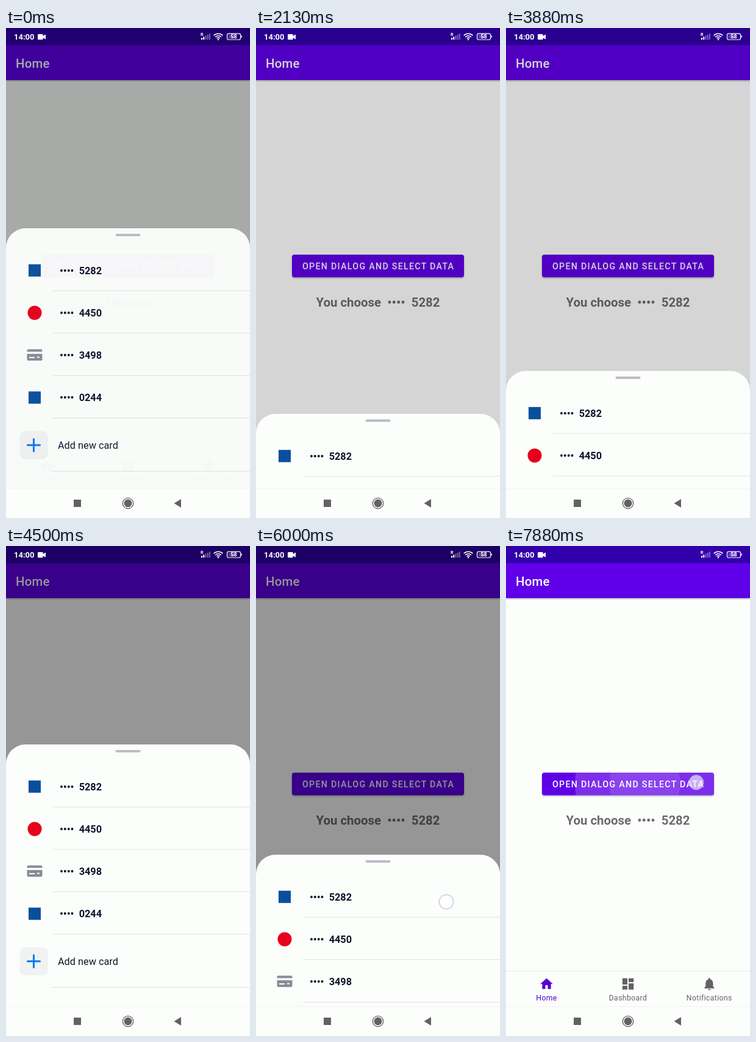
These frames come from a looping animation (400x800 px, 8 s). An HTML page:

```html
<!DOCTYPE html>
<html lang="en">
<head>
<meta charset="utf-8">
<title>Bottom sheet card picker</title>
<style>
  html, body { margin: 0; width: 100%; height: 100%; overflow: hidden; background: #fcfefc; }
  svg { display: block; width: 100%; height: 100%; }
  text { font-family: Roboto, "Noto Sans", sans-serif; white-space: pre; }
  .title { font-size: 20.4px; font-weight: 500; letter-spacing: .25px; fill: #fff; }
  .action { font-size: 14.26px; font-weight: 500; letter-spacing: 1.27px; fill: #fff; }
  .choice { font-size: 20.4px; font-weight: 700; fill: #6c6c6c; text-anchor: middle; }
  .tab text { font-size: 12.2px; letter-spacing: .4px; text-anchor: middle; }
  .row { font-size: 16.3px; fill: #10142b; }
  .card { font-weight: 700; }
</style>
</head>
<body>
<svg viewBox="0 0 400 800">
  <defs>
    <filter id="shadow" x="-10%" y="-30%" width="120%" height="180%">
      <feDropShadow dx="0" dy="1.5" stdDeviation="1.3" flood-opacity=".3"/>
    </filter>
    <clipPath id="buttonShape"><rect x="59" y="370" width="282" height="37" rx="4"/></clipPath>
  </defs>

  <!-- Home screen -->
  <rect width="400" height="800" fill="#fcfefc"/>
  <rect y="28" width="400" height="57" fill="#6000e8" filter="url(#shadow)"/>
  <rect width="400" height="28" fill="#3200aa"/>
  <text class="title" x="16" y="65">Home</text>
  <rect x="59" y="370" width="282" height="37" rx="4" fill="#6000e8" filter="url(#shadow)"/>
  <g id="ripple" clip-path="url(#buttonShape)" fill="#fff">
    <circle cx="227.5" cy="388" r="114.5" fill-opacity=".18"/>
    <circle cx="227.5" cy="388" r="58.5" fill-opacity=".1"/>
  </g>
  <text class="action" x="76" y="394">OPEN DIALOG AND SELECT DATA</text>
  <text class="choice" id="choice" x="200" y="455"></text>
  <rect y="693" width="400" height="1.5" fill="#eff0ef"/>
  <g id="tabs"></g>

  <rect id="dim" width="400" height="800"/>

  <!-- Sheet, drawn with its top edge at y = 0 -->
  <g id="sheet">
    <path d="M0 500V32A32 32 0 0 1 32 0H368A32 32 0 0 1 400 32V500Z" fill="#fcfefc"/>
    <rect x="179.5" y="9" width="41" height="4" rx="2" fill="#bcbcc8"/>
    <g id="rows"></g>
    <g fill="#878d98">
      <path d="M34.500 201.500V199.500A2 2 0 0 1 36.500 197.500H57.500A2 2 0 0 1 59.500 199.500V201.500Z"/>
      <path d="M34.500 205H59.500V214A2 2 0 0 1 57.500 216H36.500A2 2 0 0 1 34.500 214Z"/>
    </g>
    <path d="M38 211H47M51 210.500H55" stroke="#fcfefc" stroke-width="2"/>
    <rect x="22.500" y="331" width="46.500" height="46" rx="9" fill="#f1f2f2"/>
    <path d="M35.500 354H55.500M45.500 344V364" stroke="#0a78f0" stroke-width="3" stroke-linecap="round"/>
    <text class="row" x="85" y="360.300">Add new card</text>
    <rect x="74" y="396" width="326" height="1.200" fill="#e4e6e7"/>
  </g>

  <!-- System bars -->
  <rect y="752" width="400" height="48" fill="#fcfefc"/>
  <rect y="751.500" width="400" height="1" fill="#f1f2f1"/>
  <g fill="#626262">
    <rect x="111" y="770" width="12" height="12"/>
    <circle cx="200" cy="776" r="6.500"/>
    <circle cx="200" cy="776" r="8.700" fill="none" stroke="#626262" stroke-width="1.300"/>
    <path d="M287 769V783L275.500 776Z"/>
  </g>
  <g fill="#fff">
    <text x="13" y="18.800" font-size="13" font-weight="700">14:00</text>
    <path d="M53 10H60.500V13L65 10.500V18.500L60.500 16V19H53Q52 19 52 18V11Q52 10 53 10Z"/>
    <text x="319" y="13" font-size="7" font-weight="700">R</text>
    <g id="signal"></g>
    <g fill="none" stroke="#fff" stroke-width="1.500">
      <path d="M340.600 12.200A10.500 10.500 0 0 1 355.400 12.200M343.100 14.700A7 7 0 0 1 352.900 14.700M345.500 17A3.600 3.600 0 0 1 350.500 17"/>
      <rect x="362.500" y="9.200" width="22" height="9.800" rx="2.500" stroke-width="1.200"/>
    </g>
    <circle cx="348" cy="18.700" r="1.200"/>
    <rect x="385.300" y="12.300" width="1.500" height="3.500" rx=".7"/>
    <rect x="364.300" y="11" width="11" height="6.200" fill-opacity=".25"/>
    <text x="373.500" y="17.400" font-size="9" font-weight="700" text-anchor="middle">58</text>
  </g>

  <circle id="touch" cx="312" r="11.600" fill="#fff" fill-opacity=".62" stroke="#b9b9e0" stroke-opacity=".75" stroke-width="1.600"/>
</svg>

<script>
const LOOP = 8000, STEP = 125, OPEN = 324, HIDDEN = 760, DIM = .41;
const $ = id => document.getElementById(id);

const tabs = [
  ['Home', 66.5, '#5600d8', 'M10 20v-6h4v6h5v-8h3L12 3 2 12h3v8z'],
  ['Dashboard', 200, '#626262', 'M3 13h8V3H3v10zm0 8h8v-6H3v6zm10 0h8V11h-8v10zm0-18v6h8V3h-8z'],
  ['Notifications', 333.3, '#626262', 'M12 22c1.1 0 2-.9 2-2h-4c0 1.1.89 2 2 2zm6-6v-5c0-3.07-1.64-5.64-4.5-6.32V4c0-.83-.67-1.5-1.5-1.5s-1.5.67-1.5 1.5v.68C7.63 5.36 6 7.92 6 11v5l-2 2v1h16v-1l-2-2z']
];
$('tabs').innerHTML = tabs.map(([label, x, color, icon]) => `<g class="tab" fill="${color}">
  <path transform="translate(${x - 12.2} 702.8) scale(1.0185)" d="${icon}"/>
  <text x="${x}" y="741.5">${label}</text></g>`).join('');

const square = y => `<rect x="37" y="${y - 10}" width="20" height="20" fill="#0a4f9c"/>`;
const disc = y => `<circle cx="47" cy="${y}" r="11.5" fill="#e6001b"/>`;
const cards = [['5282', square], ['4450', disc], ['3498', () => ''], ['0244', square]];
$('rows').innerHTML = cards.map(([digits, mark], i) => {
  const y = 68.8 + i * 69.2;
  return `${mark(y)}<text class="row card" y="${y + 6}"><tspan x="88">••••</tspan><tspan x="119.7">${digits}</tspan></text>
    <rect x="77" y="${y + 32.7}" width="323" height="1.2" fill="#e4e6e7"/>`;
}).join('');

$('signal').innerHTML = [0, 1, 2, 3, 4].map(i =>
  `<rect x="${320 + i * 3.2}" y="${16 - i * 1.7}" width="2" height="${3 + i * 1.7}" fill-opacity="${i < 2 ? 1 : .4}"/>`).join('');

// Linear interpolation through [time, value] points
function track(points, t) {
  const i = points.findIndex(p => p[0] > t);
  if (i < 0) return points[points.length - 1][1];
  if (i === 0) return points[0][1];
  const [t0, a] = points[i - 1], [t1, b] = points[i];
  return a + (b - a) * (t - t0) / (t1 - t0);
}

const sheetY = [
  [0, 327], [375, 327], [500, 324.6], [625, OPEN],
  [1875, OPEN], [2000, 420], [2125, 630], [2250, HIDDEN],
  [3750, HIDDEN], [3875, 560], [4000, 400], [4125, 335], [4250, OPEN],
  [4750, OPEN], [5250, 395], [5500, 440], [6125, 520], [6375, 590], [6750, 750.5], [6875, HIDDEN]
];
const dimness = [
  [0, .335], [375, .335], [500, .39], [625, DIM],
  [1875, DIM], [2000, .34], [2125, .16], [2250, 0],
  [3750, 0], [3875, .16], [4000, .31], [4125, .39], [4250, DIM],
  [6750, DIM], [6875, .2], [7000, 0]
];
const solidity = [[0, .97], [375, .97], [625, 1]];
const within = (t, a, b) => t >= a && t < b;

function touchY(t, y) {
  if (within(t, 1875, 2000)) return 392;
  if (within(t, 3625, 3875) || t >= 7875) return 386;
  if (within(t, 4625, 6500)) return y + 77;
  return null;
}

function draw(now) {
  const t = Math.floor(now % LOOP / STEP) * STEP;
  const y = track(sheetY, t), finger = touchY(t, y);
  $('sheet').setAttribute('transform', `translate(0 ${y})`);
  $('sheet').setAttribute('opacity', track(solidity, t));
  $('dim').setAttribute('opacity', track(dimness, t));
  $('choice').textContent = t < 1875 ? 'Nothing' : 'You choose  ••••  5282';
  $('ripple').setAttribute('opacity', finger === 386 ? 1 : 0);
  $('touch').setAttribute('opacity', finger === null ? 0 : 1);
  $('touch').setAttribute('cy', finger ?? 0);
}

const start = performance.now();
function loop() {
  draw(performance.now() - start);
  requestAnimationFrame(loop);
}
loop();
</script>
</body>
</html>
```
